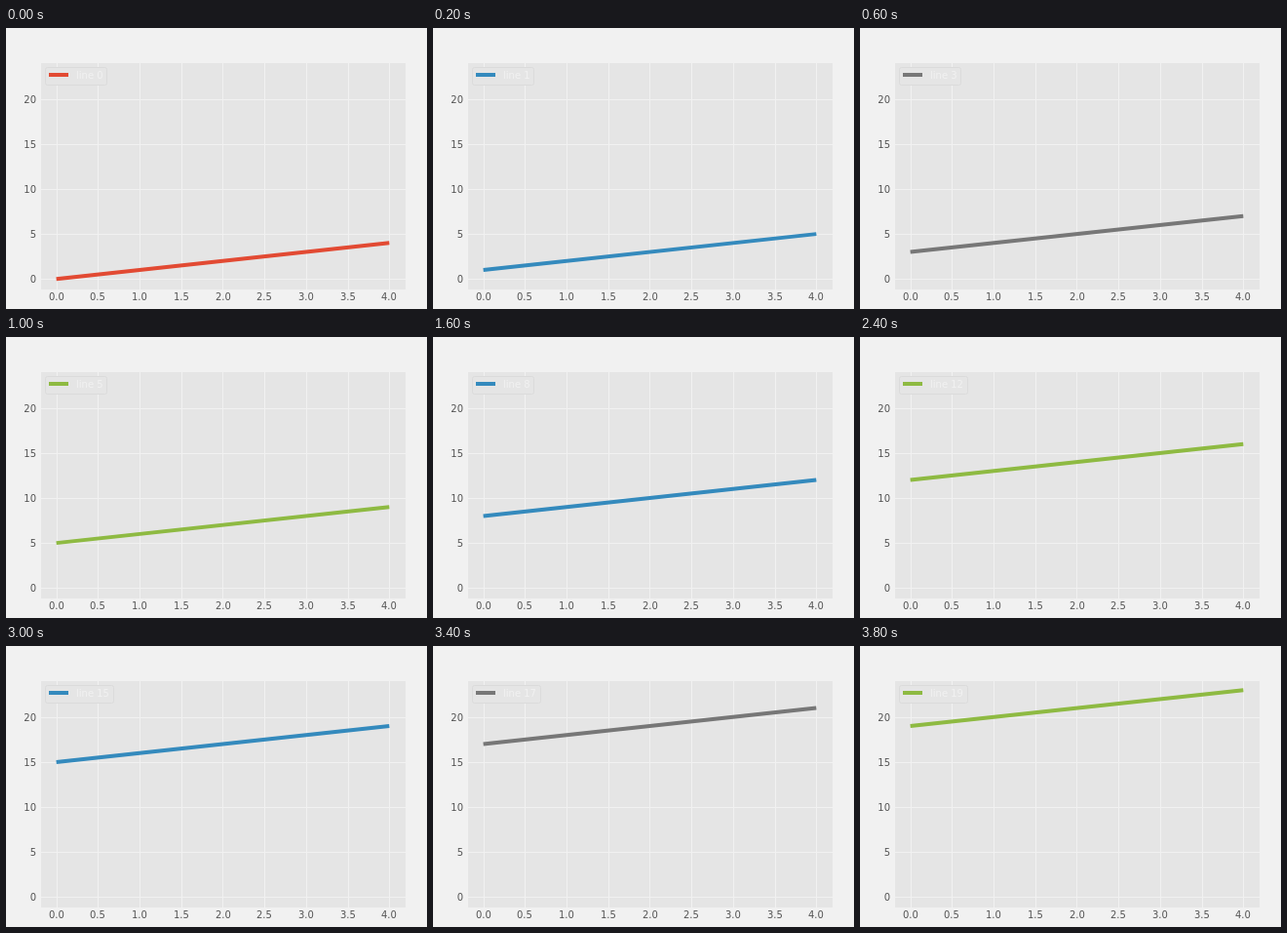
Write an HTML page that moves like this. It is 432 px wide and 288 px high and loops after 4000 ms.

```html
<!DOCTYPE html>
<html lang="en">
<head>
<meta charset="utf-8">
<title>Rising line chart</title>
<style>
  html, body { margin: 0; width: 100%; height: 100%; overflow: hidden; background: #f1f1f1; }
  svg { display: block; width: 432px; height: 288px; }
  text { font: 10px "DejaVu Sans", sans-serif; fill: #555; }
  #grid { stroke: #f1f1f1; stroke-width: 1; }
  #series, #key { stroke-width: 4; }
  #frame { fill: #e5e5e5; stroke: #dbdbdb; }
  #name { fill: #f1f1f1; }
</style>
</head>
<body>
<svg viewBox="0 0 432 288">
  <rect x="36" y="36" width="374" height="232" fill="#e5e5e5"/>
  <g id="grid"></g>
  <g id="labels"></g>
  <line id="series"/>
  <rect id="frame" x="40.5" y="40.5" height="18" rx="2"/>
  <line id="key" x1="44" y1="48" x2="64" y2="48"/>
  <text id="name" x="72" y="52"></text>
</svg>
<script>
const COLORS = ["#e24a33", "#348abd", "#988ed5", "#777777", "#fbc15e", "#8eba42", "#ffb5b8"];
const STEP_MS = 200;
const STEPS = 20;
const AXES = { left: 34.56, right: 410.4, top: 34.56, bottom: 267.84 };

const byId = id => document.getElementById(id);
const toX = v => AXES.left + (v + 0.2) / 4.4 * (AXES.right - AXES.left);
const toY = v => AXES.bottom - (v + 1.15) / 25.3 * (AXES.bottom - AXES.top);
const snap = v => Math.round(v) + 0.5;

function add(parent, tag, attrs, text = "") {
  const node = document.createElementNS("http://www.w3.org/2000/svg", tag);
  setAttrs(node, attrs);
  node.textContent = text;
  byId(parent).append(node);
}

function setAttrs(node, attrs) {
  for (const key in attrs) node.setAttribute(key, attrs[key]);
}

function drawAxes() {
  for (let v = 0; v <= 4; v += 0.5) {
    const x = snap(toX(v));
    add("grid", "line", { x1: x, x2: x, y1: 36, y2: 268 });
    add("labels", "text", { x: Math.round(toX(v) - 7.95), y: 279 }, v.toFixed(1));
  }
  for (let v = 0; v <= 20; v += 5) {
    const y = snap(toY(v));
    add("grid", "line", { x1: 36, x2: 410, y1: y, y2: y });
    add("labels", "text", { x: 31, y: Math.round(toY(v) + 3.8), "text-anchor": "end" }, v);
  }
}

let shown = -1;

function render(ms) {
  const n = Math.floor(ms / STEP_MS) % STEPS;
  if (n === shown) return;
  shown = n;
  const stroke = COLORS[n % COLORS.length];
  setAttrs(byId("series"), { x1: toX(0), y1: toY(n), x2: toX(4), y2: toY(n + 4), stroke });
  setAttrs(byId("key"), { stroke });
  setAttrs(byId("frame"), { width: n < 10 ? 63 : 70 });
  byId("name").textContent = `line ${n}`;
}

drawAxes();
render(0);
const start = performance.now();
function tick() {
  render(performance.now() - start);
  requestAnimationFrame(tick);
}
requestAnimationFrame(tick);
</script>
</body>
</html>
```
